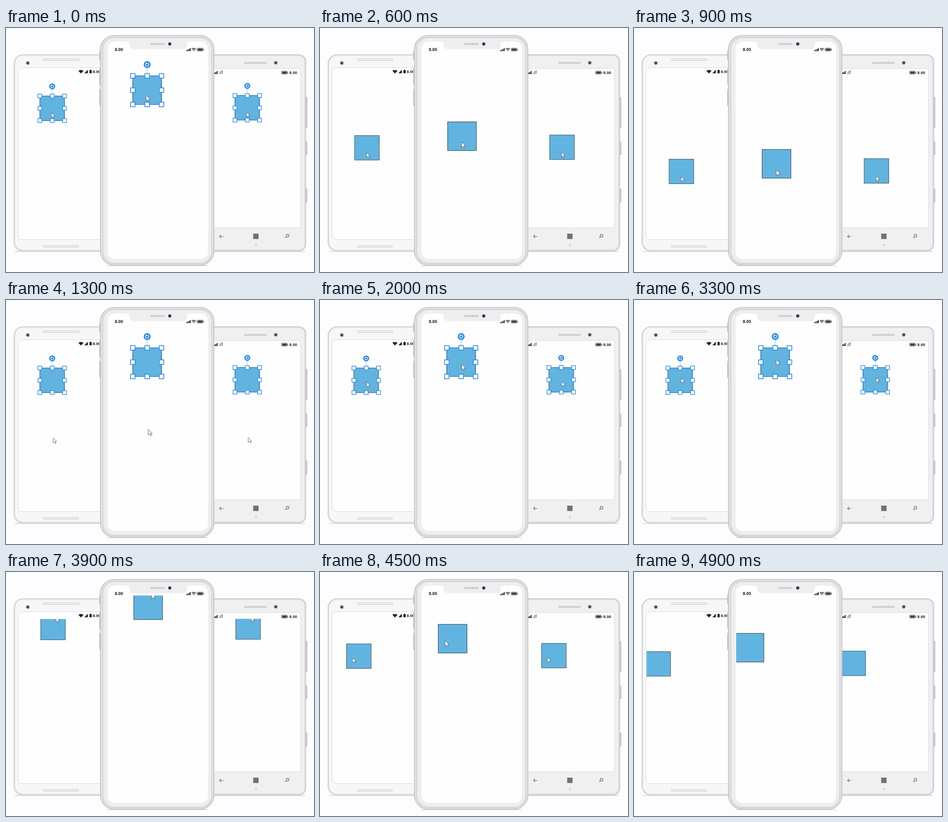
Recreate the animation shown at these times as an HTML page. Size 600 by 477 pixels, loop 5000 ms.

```html
<!DOCTYPE html>
<html lang="en">
<head>
<meta charset="utf-8">
<title>Dragging a shape on three phones</title>
<style>
  html, body { margin: 0; width: 100%; height: 100%; overflow: hidden; background: #fdfdff; }
  svg { display: block; width: 600px; height: 477px; }
  text { font: bold 8px "Open Sans", "Noto Sans", sans-serif; fill: #222; }
  .small { font-size: 7.5px; }
</style>
</head>
<body>
<svg viewBox="0 0 600 477">
  <defs>
    <clipPath id="clipLeft"><rect x="24.5" y="92" width="165" height="321"/></clipPath>
    <clipPath id="clipRight"><rect x="400" y="91.5" width="173" height="298"/></clipPath>
    <clipPath id="clipMid"><rect x="199" y="46" width="194" height="405"/></clipPath>
    <g id="wifi" fill="none" stroke="#222" stroke-width="1.2">
      <path d="M0 2.5Q4 -1 8 2.5M1.7 4.4Q4 2.3 6.3 4.4"/>
      <circle cx="4" cy="6" r=".7" fill="#222" stroke="none"/>
    </g>
    <path id="bars" d="M0 4h1.7v2H0ZM2.4 3h1.7v3H2.4ZM4.8 1.7h1.7V6H4.8ZM7.2 0h1.7v6H7.2Z" fill="#222"/>
    <g id="battery">
      <rect x=".5" y=".5" width="11" height="5.4" rx="1.2" fill="#fff" stroke="#222" stroke-width=".9"/>
      <path d="M1.7 1.7h8.6v3H1.7ZM12 2h1v2.4h-1Z" fill="#222"/>
    </g>
    <g id="camera">
      <circle r="4.2" fill="#cfcfd2"/><circle r="2.7" fill="#3c3c42"/><circle cx="-.5" cy="-.5" r=".8" fill="#85858c"/>
    </g>
  </defs>

  <rect width="600" height="477" fill="#fdfdff"/>

  <!-- left phone -->
  <path d="M18 437H190" stroke="#d5d5d7" stroke-width="1.5"/>
  <rect x="16" y="52.5" width="200" height="383" rx="17" fill="#f7f7f9" stroke="#d0d0d2" stroke-width="2.2"/>
  <rect x="18" y="54.5" width="200" height="379" rx="15" fill="none" stroke="#ededef"/>
  <g fill="#eeeeef" stroke="#cbcbcd" stroke-width=".9">
    <rect x="73" y="60" width="70" height="3.6" rx="1.8"/>
    <rect x="72.5" y="425" width="69" height="3.8" rx="1.9"/>
  </g>
  <use href="#camera" x="42.5" y="68.5"/>
  <rect x="23.5" y="77.5" width="190" height="336" rx="7" fill="#fefefe" stroke="#dcdcde"/>
  <path d="M141 83.8q5 -3.4 10 0l-5 5.2ZM152.5 88.5l7 -7v7ZM162.5 82.5h1.2v-1h2.1v1h1.2v6h-4.5Z" fill="#222"/>
  <text x="169" y="88.3" class="small">8.00</text>

  <!-- right phone -->
  <path d="M400 437H582" stroke="#d3d3d5" stroke-width="1.5"/>
  <path d="M585 135v60M585 222v26M585 314v27" stroke="#c6c6c8" stroke-width="4"/>
  <rect x="380" y="52.5" width="203.5" height="383" rx="13" fill="#f0f0f2" stroke="#cbcbcd" stroke-width="2.2"/>
  <rect x="380" y="54.5" width="201.5" height="379" rx="11" fill="none" stroke="#e2e2e4"/>
  <rect x="464" y="66.5" width="44" height="3.6" rx="1.8" fill="#cececf"/>
  <use href="#camera" x="525.5" y="68"/>
  <rect x="390" y="79.5" width="183.5" height="311" fill="#fefefe" stroke="#e0e0e2"/>
  <use href="#bars" x="403.5" y="84"/>
  <path d="M416 90a6.5 6.5 0 0 1 6.5 -6.5M418 90a4.5 4.5 0 0 1 4.5 -4.5M420 90a2.5 2.5 0 0 1 2.5 -2.5" fill="none" stroke="#444" stroke-width=".9"/>
  <use href="#battery" x="536.5" y="84"/>
  <text x="552" y="90" class="small">8.00</text>
  <g fill="none" stroke="#777" stroke-width="1.2">
    <path d="M423.5 407.5H416m3 -3l-3 3l3 3"/>
    <circle cx="548.5" cy="406" r="2.6"/><path d="M546.6 407.9l-2.6 2.6"/>
  </g>
  <rect x="481.5" y="402" width="10.5" height="10.5" fill="#727274"/>
  <circle cx="487" cy="424.5" r="1.8" fill="#cbcbcd"/>

  <g id="sideScenes"></g>

  <!-- middle phone -->
  <path d="M197 464.5H393" stroke="#cfcfd1" stroke-width="1.5"/>
  <path d="M183.5 45v18M183.5 79v32M183.5 119v33" stroke="#c3c3c5" stroke-width="4"/>
  <rect x="184" y="14.5" width="221" height="449" rx="27" fill="#e3e3e5" stroke="#c3c3c5" stroke-width="1.6"/>
  <rect x="188.5" y="18.5" width="212.5" height="441.5" rx="23" fill="#eeeef0" stroke="#d2d2d4" stroke-width="1.8"/>
  <rect x="198" y="26.5" width="195.5" height="425" rx="14" fill="#fefefe"/>
  <path d="M236 26H356q-4 1 -4 5v2q0 8.5 -8 8.5H249q-8 0 -8 -8.5v-2q0 -4 -5 -5Z" fill="#eeeef0"/>
  <rect x="281" y="29.3" width="28" height="3.8" rx="1.9" fill="#cfcfd1"/>
  <circle cx="319" cy="31.2" r="3.1" fill="#43434b"/><circle cx="319" cy="31.2" r="1.2" fill="#222228"/>
  <text x="212" y="45.2">8.00</text>
  <use href="#bars" x="351" y="39.3"/>
  <use href="#wifi" x="362" y="38.8"/>
  <use href="#battery" x="372" y="39"/>

  <g id="midScene"></g>
</svg>

<script>
const LOOP = 5000, STEP = 100, SIZE = 56;
const BLUE = '#1f86ec';
const linear = p => p;
const easeOut = p => 1 - (1 - p) ** 2;

// press and exit are cursor points, measured from the resting corner of the shape;
// after the reset the cursor walks back and is ready for the next press at "back"
const DRAGS = [
  { start: 100, end: 1000, reset: 1100, back: 1900, move: [3, 162], press: [26, 38], exit: [30.5, 202], ease: linear },
  { start: 2000, end: 2400, reset: 2500, back: 3200, move: [100, 1], press: [29, 32], exit: [158, 34], ease: linear },
  { start: 3300, end: 4000, reset: 4100, back: 4300, move: [2, -57.7], press: [30, 23], exit: [37, -53.5], ease: easeOut },
  { start: 4300, end: 4900, reset: LOOP, back: LOOP, move: [-50, 26.5], press: [29, 28], exit: [-68, 66], ease: linear }
];

const mix = (a, b, p) => a.map((v, i) => v + (b[i] - v) * p);
const progress = (t, from, to) => Math.min(1, Math.max(0, (t - from) / (to - from)));

function poseAt(t) {
  const i = Math.max(0, DRAGS.findLastIndex(d => t >= d.start));
  const d = DRAGS[i];
  if (t >= d.reset) {
    const next = DRAGS[(i + 1) % DRAGS.length].press;
    return { shape: [0, 0], cursor: mix(d.exit, next, progress(t, d.reset, d.back)), selected: true };
  }
  const p = d.ease(progress(t, d.start, d.end));
  return { shape: mix([0, 0], d.move, p), cursor: mix(d.press, d.exit, p), selected: t <= d.start };
}

function handles() {
  const side = 8.8, spots = [0, SIZE / 2, SIZE];
  let out = '';
  for (const x of spots) for (const y of spots) {
    if (x === y && x === SIZE / 2) continue;
    out += `<rect x="${x - side / 2}" y="${y - side / 2}" width="${side}" height="${side}" fill="#fff" stroke="${BLUE}" stroke-width="1.4"/>`;
  }
  return out;
}

const sceneMarkup = `
  <g class="shape">
    <rect width="${SIZE}" height="${SIZE}" fill="#62b4e0" stroke="#3d5361" stroke-width="1.1"/>
    <g class="selection">
      <path d="M0 0H${SIZE}V${SIZE}H0ZM28 -15V0" fill="none" stroke="${BLUE}" stroke-dasharray="2 2"/>
      <circle cx="28" cy="-22" r="6.7" fill="${BLUE}"/>
      <path d="M25.4 -24A3.3 3.3 0 1 0 29.6 -24.9" fill="none" stroke="#fff" stroke-width="1.3"/>
      <path d="M24.5 -25.8h3.9v3.9Z" fill="#fff"/>
      ${handles()}
    </g>
  </g>
  <path class="cursor" d="M0 0V11l2.6 -2.3l1.9 4l1.8 -.8l-1.8 -3.9H8Z" fill="#fff" stroke="#4a4a4a" stroke-width=".8"/>`;

function addScene(parent, clip, x, y, scale) {
  const host = document.getElementById(parent);
  host.insertAdjacentHTML('beforeend',
    `<g clip-path="url(#${clip})"><g transform="translate(${x} ${y}) scale(${scale})">${sceneMarkup}</g></g>`);
  const part = name => host.lastElementChild.querySelector('.' + name);
  return { shape: part('shape'), selection: part('selection'), cursor: part('cursor') };
}

const scenes = [
  addScene('sideScenes', 'clipLeft', 66, 133, .857),
  addScene('sideScenes', 'clipRight', 446, 132, .857),
  addScene('midScene', 'clipMid', 247, 93.5, 1)
];

const place = (el, point) => el.setAttribute('transform', `translate(${point})`);

function draw(time) {
  const pose = poseAt(Math.floor((time % LOOP) / STEP) * STEP);
  for (const s of scenes) {
    place(s.shape, pose.shape);
    place(s.cursor, pose.cursor);
    s.selection.setAttribute('visibility', pose.selected ? 'visible' : 'hidden');
  }
}

const begin = performance.now();
function tick() {
  draw(performance.now() - begin);
  requestAnimationFrame(tick);
}
tick();
</script>
</body>
</html>
```
